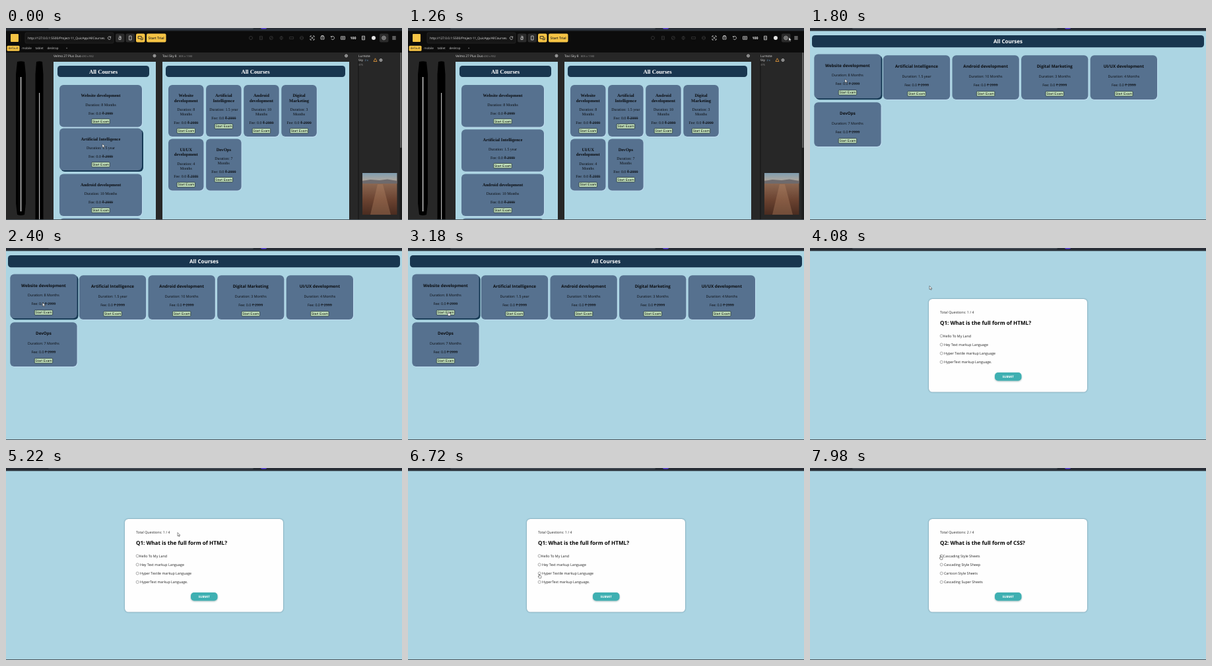
Write an HTML page that moves like this. It is 600 by 290 pixels and loops after 8 s.

```html
<!DOCTYPE html>
<html lang="en">
<head>
<meta charset="utf-8">
<title>Course quiz walkthrough</title>
<style>
html, body { margin: 0; width: 100%; height: 100%; overflow: hidden; background: #acd5e3; }
svg { display: block; width: 100vw; height: 100vh; text-rendering: geometricPrecision; }
text { white-space: pre; }
.sans { font-family: "Open Sans", "Noto Sans", sans-serif; }
.serif { font-family: "Liberation Serif", serif; }
.arial { font-family: "Liberation Sans", sans-serif; }
.icon { fill: none; stroke: #d6d6d6; stroke-width: .8; }
.icon.dim { stroke: #393939; }
</style>
</head>
<body>
<svg id="stage" viewBox="0 0 600 290"></svg>
<script>
const LOOP = 8000;
const PAGE = '#acd5e3', NAVY = '#19364f', CARD = '#56718f', YELLOW = '#f6c445';

const rect = (x, y, w, h, fill, r = 0, extra = '') =>
  `<rect x="${x}" y="${y}" width="${w}" height="${h}" rx="${r}" fill="${fill}" ${extra}/>`;

// y is the visual middle of the line
const text = (x, y, str, size, fill = '#111', cls = 'sans', extra = '') =>
  `<text x="${x}" y="${y + size * 0.34}" font-size="${size}" fill="${fill}" class="${cls}" ${extra}>${str}</text>`;

const MID = 'text-anchor="middle"', BOLD = 'font-weight="700"';
const group = (id, body) => `<g id="${id}">${body}</g>`;
const icon = (x, y, d, cls = '') =>
  `<path class="icon ${cls}" transform="translate(${x} ${y})" d="${d}"/>`;
const ring = r => `M${-r} 0a${r} ${r} 0 1 0 ${2 * r} 0a${r} ${r} 0 1 0 ${-2 * r} 0`;
const box = (w, h) => `M${-w / 2} ${-h / 2}h${w}v${h}h${-w}z`;
const GEAR = ring(2) + ring(0.8);

const courses = [
  ['Website development', '8 Months'],
  ['Artificial Intelligence', '1.5 year'],
  ['Android development', '10 Months'],
  ['Digital Marketing', '3 Months'],
  ['UI/UX development', '4 Months'],
  ['DevOps', '7 Months']
];

const cards = [];

// s: font class, sizes, line heights, first line offset and gaps between blocks
const serifStyle = { cls: 'serif', title: 6.6, body: 5.9, titleLine: 7.6, bodyLine: 6.8, gaps: [16, 13.8, 12.7, 12.4] };
const sansStyle = { cls: 'sans', title: 6.25, body: 5.3, titleLine: 8, bodyLine: 7, gaps: [17, 14.5, 13.2, 13.3] };

function courseCard(scene, x, y, w, h, course, s, narrow) {
  const [name, span] = course, cx = x + w / 2;
  const titles = narrow ? name.split(' ') : [name];
  const durations = narrow && span.endsWith('Months')
    ? ['Duration: ' + span.split(' ')[0], 'Months'] : ['Duration: ' + span];
  let at = y + s.gaps[0], out = '';
  const lines = (list, size, step, extra) => list.forEach((str, i) => {
    if (i) at += step;
    out += text(cx, at, str, size, '#0b0d10', s.cls, `${MID} ${extra}`);
  });
  lines(titles, s.title, s.titleLine, BOLD);
  at += s.gaps[1];
  lines(durations, s.body, s.bodyLine, '');
  at += s.gaps[2];
  lines(['Fee: 0.0 <tspan text-decoration="line-through">₹ 2999</tspan>'], s.body, 0, '');
  at += s.gaps[3];
  out += rect(cx - 13.7, at - 3.6, 27.4, 7.2, '#c6e6c1', 1, 'stroke="#1d2a2a" stroke-width=".7"')
    + text(cx, at, 'Start Exam', 5.1, '#000', 'arial', MID);
  const id = 'card' + cards.length;
  cards.push({ id, scene, x, y, w, h });
  return group(id, rect(x, y, w, h, '#bfdcf0', 6, 'class="shade"') + rect(x, y, w, h, CARD, 6) + out);
}

const browserEdge = () =>
  rect(0, 0, 600, 4.5, '#282e36') + rect(64, -3, 311, 5, '#404750', 2)
  + '<ellipse cx="390.5" cy="0" rx="4.5" ry="1.6" fill="#5a3fe0"/>';

function toolbar() {
  let out = rect(0, 4.5, 600, 32.5, '#0c0c0c') + rect(7, 9, 12, 12, YELLOW, 1);
  out += rect(29, 7, 134, 16, '#161616', 2, 'stroke="#2c2c2c" stroke-width=".6"')
    + text(33, 15.2, 'http://127.0.0.1:5500/Project-11_QuicApp/AllCourses.', 4.75, '#e6e6e6')
    + icon(156.5, 15, 'M1.8 -1.2A2.2 2.2 0 1 0 2.2 .6M2.2 -2.4v1.6h-1.6');
  out += rect(166, 8.5, 13.5, 13, '#2b2b2b', 2) + icon(173, 15, 'M-2 -2.5h3v3M-2 2.5v-3h3v3z')
    + rect(181.5, 8.5, 13.5, 13, '#2b2b2b', 2) + icon(188.3, 15, box(3.4, 6))
    + rect(197, 8.5, 13.5, 13, YELLOW, 2)
    + `<path transform="translate(203.7 15)" d="M-3.5 -2.5h5v3.5h-5zM0 2.7h3.5v-3.5" fill="none" stroke="#222" stroke-width=".9"/>`
    + rect(213, 8.5, 29.5, 13, YELLOW, 2) + text(227.8, 15, 'Start Trial', 5.1, '#1a1a1a', 'sans', `${MID} font-weight="600"`);
  [ring(2.5), box(4, 5) + 'M-2 0h4', ring(2.5) + 'M-2 2l4-4', ring(2.2) + 'M0 -3v6', box(6, 3), ring(2.5) + 'M-3 0h6']
    .forEach((d, i) => out += icon(371 + i * 15.4, 15, d, 'dim'));
  out += icon(464, 15, 'M-3 -1v-2h2M1 -3h2v2M3 1v2h-2M-1 3h-2v-2' + ring(1))
    + icon(479.5, 15, box(5, 4) + 'M-1.5 -2v-1.5h3v1.5M-1 0h2')
    + icon(495, 15, 'M-2 -1.5A2.5 2.5 0 1 1 -2.3 1M-2.5 -3v1.8h1.8')
    + icon(510.5, 15, box(6, 4.4) + ring(1.2))
    + text(526, 15, '100', 5.3, '#f0f0f0', 'sans', `${MID} ${BOLD}`)
    + icon(541.5, 15, box(4, 5.6) + 'M-1 -1h2M-1 1h2')
    + '<circle cx="557" cy="15" r="3" fill="#e4e4e4"/>'
    + rect(566, 8.5, 13.5, 13, '#2b2b2b', 2) + icon(572.5, 15, ring(2.7) + ring(0.9))
    + icon(588, 15, 'M-2.7 -2h5.4M-2.7 0h5.4M-2.7 2h5.4');
  out += rect(1.5, 26.8, 19, 8, YELLOW, 1.5) + text(11, 30.8, 'default', 4.5, '#222', 'sans', MID);
  [['mobile', 31.5], ['tablet', 50.5], ['desktop', 71], ['+', 92]]
    .forEach(([s, x]) => out += text(x, 30.8, s, 4.5, '#d0d0d0', 'sans', MID));
  return out;
}

function sideFrames() {
  return '<path d="M17 51Q22.5 49.5 28 51L30 70V265L28 282Q22.5 284 17 282L15 265V70z" fill="#000"/>'
    + rect(22, 74, 1.2, 203, '#e8e8e8')
    + '<path d="M46 51Q51 49.5 55 51L56.5 70V290H44.5V70z" fill="#000"/>'
    + rect(50, 98, 1.2, 192, '#b9b9b9');
}

function poster() {
  return rect(540, 219, 52.5, 63, 'url(#dusk)')
    + '<path d="M540 231l12 -2 14 1 12 -1.5 14.500 2.500v4h-52.500z" fill="#6e6a6c"/>'
    + '<path d="M552 282L563 236h8L583 282z" fill="#b98a68" opacity=".35"/>';
}

const heading = (x, y, w, h, cls, size) =>
  rect(x, y, w, h, NAVY, 4.5) + text(x + w / 2, y + h / 2 + 0.2, 'All Courses', size, '#fff', cls, `${MID} ${BOLD}`);

function previewScene() {
  let out = rect(0, 0, 600, 290, '#272727') + browserEdge() + toolbar() + sideFrames();
  out += text(72, 42, 'Velmo 27 Plus Duo', 4.8, '#e2e2e2') + text(115, 42.3, '430 x 932', 4, '#9a9a9a')
    + icon(225, 42, GEAR)
    + text(237, 42, 'Tovi Sky 8', 4.8, '#e2e2e2') + text(262, 42.3, '805 x 1180', 4, '#9a9a9a')
    + icon(515.5, 42, GEAR)
    + text(534, 42, 'Lurnote', 4.8, '#e2e2e2') + text(534, 48.7, 'Sky', 4.5, '#e2e2e2')
    + text(543.5, 48.7, '2 x', 4, '#6fa8d8') + text(534, 55.7, '375', 4, '#9a9a9a')
    + '<path d="M559.500 45.800l2.500 4.700h-5z" fill="none" stroke="#f0a03c" stroke-width=".8"/>'
    + icon(568, 48.5, GEAR) + rect(533.6, 50, 0.8, 240, '#101010');
  out += rect(72, 51, 155, 239, PAGE) + heading(78, 57, 139, 17, 'serif', 8.7);
  courses.slice(0, 4).forEach((c, i) => out += courseCard('preview', 81, 86 + i * 67.2, 125, 63.5, c, serifStyle));
  out += rect(237, 51, 283, 239, PAGE) + heading(242, 57, 272, 17, 'serif', 8.7);
  courses.forEach((c, i) =>
    out += courseCard('preview', 246 + i % 4 * 57.1, 86 + (i >> 2) * 81.4, 53.5, 78, c, serifStyle, true));
  return out + poster() + rect(596.5, 37, 3.5, 253, '#1d1d1d') + rect(597, 37, 2.5, 144, '#5a5a5a', 1);
}

function coursesScene() {
  let out = rect(0, 0, 600, 290, PAGE) + browserEdge() + heading(3, 11, 594, 18.3, 'sans', 8);
  courses.forEach((c, i) =>
    out += courseCard('courses', 6.3 + i % 5 * 104.6, 41.3 + Math.floor(i / 5) * 71, 101.3, 66.8, c, sansStyle));
  return out;
}

const questions = [
  ['Q1: What is the full form of HTML?', 'Hello To My Land', 'Hey Text markup Language',
    'Hyper Textile markup Language', 'HyperText markup Language.'],
  ['Q2: What is the full form of CSS?', 'Cascading Style Sheets', 'Cascading Style Sheep',
    'Cartoon Style Sheets', 'Cascading Super Sheets']
];
const optionY = i => 133 + i * 13.15;

function question([title, ...options], n) {
  let out = text(197, 97.7, `Total Questions: ${n + 1} / 4`, 5.25, '#222') + text(197, 113, title, 8.1, '#000', 'sans', BOLD);
  options.forEach((str, i) => out +=
    `<circle cx="199.200" cy="${optionY(i) - 0.2}" r="2.100" fill="#fff" stroke="#767676" stroke-width=".6"/>`
    + text(i ? 203 : 201.6, optionY(i), str, 5.3, '#222'));
  return group('q' + n, out);
}

function quizScene() {
  return rect(180, 77, 240, 140.5, '#3f6478', 5.5, 'filter="url(#soft)" opacity=".75"')
    + rect(180, 77, 240, 140.5, '#fefefe', 5.5)
    + questions.map(question).join('')
    + group('picked', `<circle cx="199.200" cy="${optionY(3) - 0.2}" r="2.100" fill="#fff" stroke="#0075ff" stroke-width=".6"/>`
      + `<circle cx="199.200" cy="${optionY(3) - 0.2}" r="1.200" fill="#0075ff"/>`)
    + rect(280, 189, 40.5, 12.5, '#6b8f92', 5, 'filter="url(#soft)" opacity=".6"')
    + rect(280, 188, 40.5, 12.5, '#3eb0b2', 5)
    + text(300.2, 194.2, 'SUBMIT', 4.6, '#fff', 'sans', `${MID} ${BOLD}`);
}

const cursorArt =
  '<path id="arrow" d="M0 0V5.400L1.300 4.300L2.200 6.200L3.100 5.800L2.200 4H3.900z" fill="#fff" stroke="#222" stroke-width=".5"/>'
  + '<path id="hand" d="M-.6 .5Q0 -.4 .6 .5V2.400L2.600 2.900Q3.300 3.200 3.100 4L2.600 6.300H-.4L-2 3.900Q-1.700 3.100 -.6 4z" fill="#fff" stroke="#222" stroke-width=".5"/>';

document.getElementById('stage').innerHTML =
  `<defs><linearGradient id="dusk" x1="0" y1="0" x2="0" y2="1">
    <stop offset="0" stop-color="#7f9db0"/><stop offset=".16" stop-color="#a9a6a0"/>
    <stop offset=".26" stop-color="#8a6650"/><stop offset=".65" stop-color="#6a4230"/><stop offset="1" stop-color="#4a2c20"/>
  </linearGradient><filter id="soft" x="-10%" y="-20%" width="120%" height="140%"><feGaussianBlur stdDeviation="1.300"/></filter></defs>`
  + group('preview', previewScene()) + group('courses', coursesScene())
  + group('blank', rect(0, 0, 600, 290, PAGE) + browserEdge()) + group('quiz', quizScene())
  + rect(0, 289, 600, 1, '#4a555c') + group('cursor', cursorArt);

const $ = id => document.getElementById(id);
const show = (id, on) => { $(id).style.display = on ? '' : 'none'; };
cards.forEach(c => { c.el = $(c.id); c.shade = c.el.querySelector('.shade'); });

const CUT = { courses: 1440, blank: 3300, quiz: 3420, pick: 7020, next: 7440 };

// time, x, y of the pointer tip
const path = [
  [0, 146, 175], [60, 146, 175], [840, 573, 16], [1200, 577, 14], [1440, 577, 14], [1740, 53, 77],
  [1900, 53, 77], [2600, 56, 84], [3000, 61.5, 96], [3180, 61.5, 96], [3360, 61, 97], [3720, 61, 97],
  [4060, 180, 56], [4440, 298, 193], [4620, 298, 193], [5160, 260, 97.5], [5460, 260, 97.5],
  [5820, 236, 97], [6000, 236, 97], [6400, 199, 140], [6700, 199, 160], [6840, 199, 160],
  [6980, 199, 171], [7080, 199, 171], [7320, 300, 193], [7620, 300, 193], [7920, 198, 132], [8000, 198, 132]
];

function pointer(t) {
  const i = path.findIndex(p => p[0] > t);
  const [t0, x0, y0] = path[i - 1], [t1, x1, y1] = path[i];
  const u = (t - t0) / (t1 - t0), e = u * u * (3 - 2 * u);
  return [x0 + (x1 - x0) * e, y0 + (y1 - y0) * e];
}

const inside = (x, y, r) => x >= r.x && x <= r.x + r.w && y >= r.y && y <= r.y + r.h;
const submitBox = { x: 280, y: 188, w: 40, h: 12.5 };
const startBox = { x: 43, y: 92, w: 28, h: 9 };

function draw(t) {
  const scene = t < CUT.courses ? 'preview' : t < CUT.blank ? 'courses' : t < CUT.quiz ? 'blank' : 'quiz';
  const [x, y] = pointer(t);
  show('preview', scene === 'preview');
  show('courses', scene === 'courses');
  show('blank', scene === 'blank' || scene === 'quiz');
  show('quiz', scene === 'quiz');
  show('q0', t < CUT.next);
  show('q1', t >= CUT.next);
  show('picked', t >= CUT.pick && t < CUT.next);
  for (const c of cards) {
    const over = c.scene === scene && inside(x, y, c);
    c.el.setAttribute('transform', `translate(0 ${over ? -1.8 : 0})`);
    c.shade.setAttribute('transform', over ? 'translate(2 2)' : 'translate(.9 .9)');
    c.shade.setAttribute('fill', over ? '#173a55' : '#bfdcf0');
  }
  const onRadio = [0, 1, 2, 3].some(i => Math.hypot(x - 199.2, y - optionY(i)) < 2.8);
  const hand = scene === 'quiz' ? onRadio || inside(x, y, submitBox)
    : scene === 'blank' || scene === 'courses' && inside(x, y, startBox);
  show('hand', hand);
  show('arrow', !hand);
  $('cursor').setAttribute('transform', `translate(${x} ${y})`);
}

function tick() {
  draw(performance.now() % LOOP);
  requestAnimationFrame(tick);
}
tick();
</script>
</body>
</html>
```
